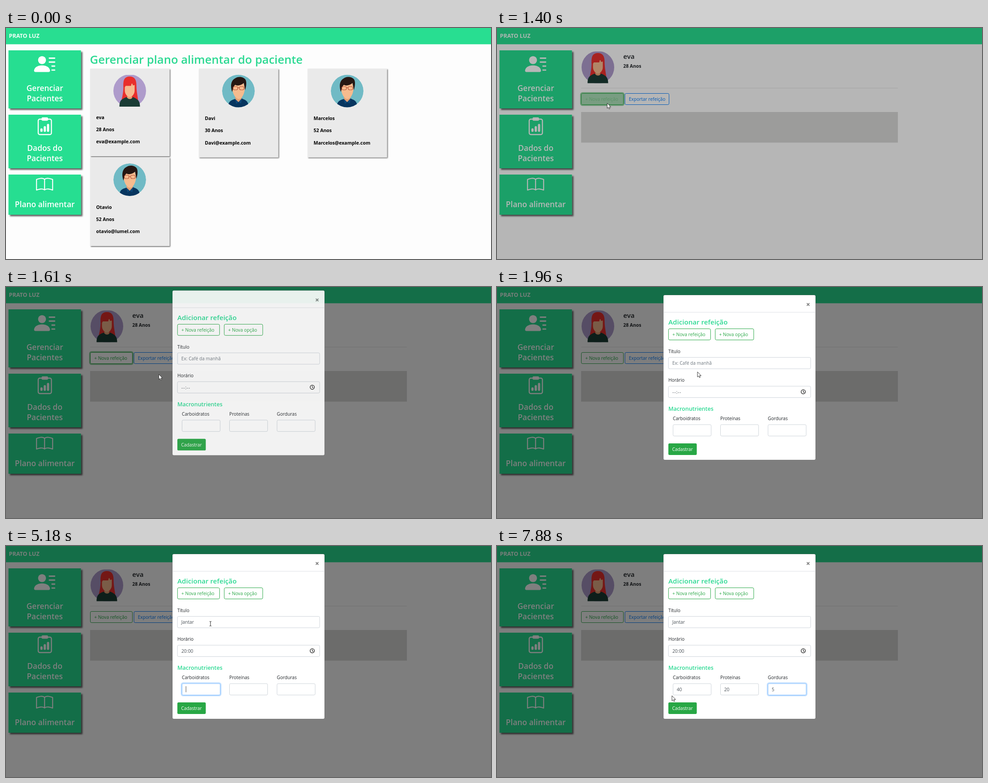
Animation, 1084 px wide and 517 px high, one loop 8000 ms. Source, as an HTML page:

```html
<!DOCTYPE html>
<html lang="pt">
<head>
<meta charset="utf-8">
<title>Plano alimentar</title>
<style>
html, body { margin: 0; width: 100%; height: 100%; overflow: hidden; background: #fdfdfd; }
svg { display: block; width: 1084px; height: 517px; font-family: "Open Sans", "Noto Sans", sans-serif; }
text { white-space: pre; }
</style>
</head>
<body>
<svg id="stage" viewBox="0 0 1084 517" xmlns="http://www.w3.org/2000/svg"></svg>
<script>
const GREEN = '#28de91', BTN = '#28a745', BLUE = '#007bff', INK = '#212529', VALUE = '#495057';
const LOOP = 8000;

// ---- markup helpers ----
const text = (x, y, s, size = 10.2, fill = INK, weight = 400, extra = '') =>
  `<text x="${x}" y="${y}" font-size="${size}" fill="${fill}" font-weight="${weight}" ${extra}>${s}</text>`;
const rect = (x, y, w, h, fill, extra = '') =>
  `<rect x="${x}" y="${y}" width="${w}" height="${h}" fill="${fill}" ${extra}/>`;
const path = (d, fill, extra = '') => `<path d="${d}" fill="${fill}" ${extra}/>`;
const group = (id, body, extra = '') => `<g id="${id}" ${extra}>${body}</g>`;
const outline = (x, y, w, label, color, id = '') =>
  rect(x, y, w, 25, 'none', `rx="2.7" stroke="${color}"`) +
  text(x + 8.7, y + 16.5, label, 10.2, color, 400, id && `id="${id}Text"`);
const input = (id, x, y, w) =>
  rect(x - 1.6, y - 1.6, w + 3.2, 28.7, 'none', `id="${id}Ring" rx="4" stroke="${BLUE}" stroke-opacity=".25" stroke-width="2.4" opacity="0"`) +
  rect(x, y, w, 25.5, '#fff', `id="${id}Box" rx="2.7" stroke="#ced4da"`);

const woman = (x, y) => `<g transform="translate(${x} ${y})" clip-path="url(#flat)">
  <circle r="36.5" fill="#ae9bcb"/>
  ${path('M-14-12C-15-26-10-32 0-32C10-32 15-26 15-12C15 2 18 12 19 24H-19C-16 12-14 2-14-12Z', '#e92f2c')}
  ${path('M-5 6H5V17L0 23L-6 17Z', '#e5a173')}
  ${path('M-11-16H11V0C11 7 5 14 0 14C-5 14-11 7-11 0Z', '#f6ba8f')}
  ${path('M-14-8C-15-24-8-30 0-30C9-30 15-22 14-8L11-13L7-12L5-19L3-11L-9-11L-11-8Z', '#e92f2c')}
  ${path('M-23 36C-23 23-20 19-7 14C-3 20 4 20 7 14C19 19 23 23 23 36Z', '#1a3c35')}</g>`;
const man = (x, y) => `<g transform="translate(${x} ${y})" clip-path="url(#disc)">
  <circle r="36.5" fill="#70bac5"/>
  ${path('M-7 6H7V22L0 26L-7 20Z', '#e5a173')}
  ${path('M-14-10L-5-17C2-13 9-18 11-20L14-8C15 4 8 18 1 18C-7 18-14 5-14-10Z', '#f6bb8e')}
  ${path('M-14 2C-19-12-16-24-8-28C0-34 12-32 16-25C19-19 17-9 15-2L12-18C6-12-4-11-7-14C-12-10-12-4-14 2Z', '#261713')}
  <g fill="none" stroke="#b5533a" stroke-width="1.2"><rect x="-12" y="-10" width="10.500" height="7.500" rx="3.400"/>
  <rect x="2" y="-10" width="10.500" height="7.500" rx="3.400"/><path d="M-1.500-7Q.2-8.500 2-7"/></g>
  ${path('M-24 37C-22 23-18 21-8 18L0 25L8 17C18 21 22 23 23 37Z', '#07355f')}
  ${path('M-8 17L0 25L-5 29ZM8 16L0 25L6 28Z', '#0d4677')}</g>`;

const card = (x, y, h, face, lines) =>
  rect(x, y, 177.5, h, '#eaeaea', 'filter="url(#soft)"') + face(x + 88.5, y + (face === woman ? 49.5 : 50)) +
  lines.map((s, i) => text(x + 13.5, y + h - 83.5 + i * 27.3, s, 10.5, '#000', 700)).join('');

const tile = (y, h, lines, base) =>
  rect(5.5, y, 162, h, GREEN, 'filter="url(#drop)"') +
  lines.map((s, i) => text(86.7, base + i * 23.4, s, 17.4, '#fff', 600, 'text-anchor="middle"')).join('');

// ---- scene pieces ----
const defs = `<defs>
  <clipPath id="disc"><circle r="36.5"/></clipPath>
  <clipPath id="flat"><rect x="-37" y="-35.5" width="74" height="71"/></clipPath>
  <filter id="drop" x="-10%" y="-10%" width="120%" height="120%"><feDropShadow dx="3.4" dy="3.4" stdDeviation="1.5" flood-color="#000" flood-opacity=".6"/></filter>
  <filter id="soft" x="-10%" y="-10%" width="120%" height="120%"><feDropShadow dx="1.6" dy="1.6" stdDeviation=".9" flood-color="#000" flood-opacity=".6"/></filter>
</defs>`;

const icons = `<g transform="translate(62.700 57) scale(2.97)" fill="#fff"><circle cx="6" cy="5" r="3"/>
  <path d="M1 14s-1 0-1-1 1-4 6-4 6 3 6 4-1 1-1 1z"/>
  <path d="M11.500 3.500h4M11.500 6.500h4M13.500 9.500h2M13.500 12.500h2" stroke="#fff" stroke-linecap="round"/></g>
  <rect x="72" y="204" width="29.500" height="34.500" rx="3.500" fill="none" stroke="#fff" stroke-width="2.400"/>
  <rect x="79.500" y="200" width="14.500" height="7.500" rx="2.500" fill="#fff"/>
  <path d="M79.300 227V230M86.700 222V230M94 217V230" stroke="#fff" stroke-width="5" stroke-linecap="round"/>
  <g transform="translate(67 333) scale(2.4)" fill="none" stroke="#fff" stroke-width=".9" stroke-linejoin="round">
  <path d="M8 2.400C7 1.400 5.600 1.300 4.400 1.440 3 1.600 1.600 2 .5 2.500V12.400c1.200-.5 2.500-.85 3.800-1 1.400-.1 2.800 0 3.700.9V2.400c1-1 2.400-1.100 3.600-.96 1.400.16 2.800.56 3.900 1.060V12.400c-1.200-.5-2.500-.85-3.800-1-1.400-.1-2.800 0-3.700.9"/></g>`;

const shell = rect(0, 0, 1084, 517, '#fdfdfd') + rect(0, 0, 1084, 36.4, GREEN) +
  text(6.5, 22.3, 'PRATO LUZ', 12.6, '#f4fff9', 700) +
  tile(50, 130, ['Gerenciar', 'Pacientes'], 140.7) +
  tile(194, 120, ['Dados do', 'Pacientes'], 274.8) +
  tile(328, 90, ['Plano alimentar'], 401.4) + icons;

const list = text(187.6, 79.5, 'Gerenciar plano alimentar do paciente', 25.6, '#2bd992', 600) +
  card(188, 91, 196, woman, ['eva', '28 Anos', 'eva@example.com']) +
  card(431, 91, 198.5, man, ['Davi', '30 Anos', 'Davi@example.com']) +
  card(674, 91, 198.5, man, ['Marcelos', '52 Anos', 'Marcelos@example.com']) +
  card(188, 289.5, 198.5, man, ['Otavio', '52 Anos', 'otavio@lumel.com']);

const patient = woman(225.5, 88) + text(282.3, 69, 'eva', 15, INK, 600) +
  text(282.3, 89, '28 Anos', 10.4, INK, 700) +
  rect(188, 134, 708, 1, '#e6e6e6') +
  rect(187, 145, 97, 28, 'none', `id="newRing" rx="4" stroke="${BTN}" stroke-opacity=".5" stroke-width="2.4"`) +
  rect(188.5, 146.5, 94, 25, BTN, 'id="newFill" rx="2.7"') +
  outline(188.5, 146.5, 94, '+ Nova refeição', BTN, 'new') +
  outline(286, 146.5, 98.5, 'Exportar refeição', BLUE) +
  rect(188, 188, 708, 68.5, '#d9d9d8');

const macros = [['carb', 393.5, 'Carboidratos'], ['prot', 499.5, 'Proteínas'], ['fat', 605.8, 'Gorduras']];
const dialog = rect(372, 18, 340, 369, '#fff', 'rx="3" stroke="#000" stroke-opacity=".2"') +
  rect(372, 56, 340, 1, '#dee2e6') +
  path('M692.500 36.200L698.300 42M698.300 36.200L692.500 42', 'none', 'stroke="#7f7f7f" stroke-width="1.8"') +
  text(383, 84, 'Adicionar refeição', 15.15, '#2bd992', 600) +
  outline(383.3, 93.5, 94, '+ Nova refeição', BTN) + outline(487.8, 93.5, 86, '+ Nova opção', BTN) +
  text(383, 147.7, 'Título') + input('title', 383.2, 157.5, 317.8) +
  text(391.8, 174.3, '', 10.2, VALUE, 400, 'id="titleText"') +
  text(383, 212, 'Horário') + input('time', 383.2, 222, 317.8) +
  rect(392, 227, 12, 14, '#0078d7', 'id="mark"') +
  text(392, 238.7, '', 10.2, VALUE, 400, 'id="hour"') + text(400, 238.7, ':', 10.2, VALUE, 400, 'id="colon"') +
  text(403, 238.7, '', 10.2, VALUE, 400, 'id="minute"') +
  '<circle cx="684.500" cy="234.500" r="4.700" fill="none" stroke="#111" stroke-width="1.300"/>' +
  path('M684.500 231.500V234.800L687 236', 'none', 'stroke="#111" stroke-width="1.1"') +
  text(383, 277.2, 'Macronutrientes', 12.5, '#2bd992', 600) +
  macros.map(([id, x, name]) => text(x - .5, 298, name) + input(id, x, 308, 85.2) +
    text(x + 8.2, 324.7, '', 10.2, VALUE, 400, `id="${id}Text"`)).join('') +
  rect(383, 350, 63.5, 26, BTN, 'rx="2.7"') + text(391.4, 367, 'Cadastrar', 10.2, '#fff') +
  rect(0, 0, .8, 13.5, '#222', 'id="caret"');

const cursors =
  group('arrow', path('M0 0V11.500L2.600 9.200L4.400 13L6.300 12.100L4.600 8.500H8.200Z', '#fff', 'stroke="#222" stroke-width=".9" stroke-linejoin="round"')) +
  group('hand', path('M-1.300 1C-1.300-.4 1-.4 1 1V5.500C1.400 4.600 3 4.800 3.100 6C3.600 5.200 5 5.400 5.200 6.600C5.800 5.900 7.200 6.300 7.200 7.600V11C7.200 13 6 14 6 15.800H-.6C-.8 13.700-3.600 11-4 9.400C-4.100 8-2.600 7.700-1.300 9.600Z', '#fff', 'stroke="#222" stroke-width=".9" stroke-linejoin="round"')) +
  group('beam', path('M-2.200-5.200Q0-5.200 0-4Q0-5.200 2.200-5.200M0-4V4M-2.200 5.200Q0 5.200 0 4Q0 5.200 2.200 5.200', 'none', 'stroke="#222" stroke-width="1"'));

document.getElementById('stage').innerHTML = defs + shell + group('list', list) + group('patient', patient) +
  rect(0, 0, 1084, 517, '#000', 'id="shade"') + group('dialog', dialog) + group('cursor', cursors);

// ---- timing ----
const el = id => document.getElementById(id);
const set = (id, name, value) => el(id).setAttribute(name, value);
const show = (id, on) => set(id, 'visibility', on ? 'inherit' : 'hidden');
const ramp = (t, start, span) => Math.min(1, Math.max(0, (t - start) / span));
const latest = (steps, t) => steps.reduce((found, s) => s[0] <= t ? s : found, steps[0]);
const toWhite = (rgb, k) => `rgb(${rgb.map(c => Math.round(c + (255 - c) * k))})`;

const trail = [
  [170, 912, 482], [510, 261, 219], [980, 261, 219], [1190, 240, 163], [1320, 246, 168], [1400, 246, 168],
  [1470, 263, 186], [1680, 380, 200], [1960, 448, 190], [2170, 457, 174], [7480, 457, 174],
  [7670, 408, 262], [7800, 379, 328], [7880, 391, 335]
];
const shapes = [[0, 'arrow'], [330, 'hand'], [1000, 'arrow'], [1130, 'hand'], [1370, 'arrow'], [2080, 'beam'], [7550, 'arrow']];

// each field: focus start, focus end, typed states
const fields = {
  title: { on: 2240, off: 3840, x: 391.8, y: 163.5, keys: [[2240, ''], [2780, 'J'], [3110, 'Ja'], [3240, 'Jan'], [3440, 'Jant'], [3540, 'Janta'], [3640, 'Jantar']] },
  time: { on: 3840, off: 5040 },
  carb: { on: 5040, off: 5990, x: 401.8, y: 313.8, keys: [[5010, ''], [5710, '4'], [5860, '40']] },
  prot: { on: 5990, off: 6730, x: 507.8, y: 313.8, keys: [[5990, ''], [6200, '2'], [6400, '20']] },
  fat: { on: 6730, off: LOOP, x: 614, y: 313.8, keys: [[6730, ''], [7270, '5']] }
};
const clock = [[0, '--', '--'], [4380, '02', '--'], [4510, '20', '--'], [4710, '20', '00']];

function cursorAt(t) {
  const i = trail.findIndex(p => p[0] > t);
  if (i < 0) return trail[trail.length - 1].slice(1);
  if (i === 0) return trail[0].slice(1);
  const [a, b] = [trail[i - 1], trail[i]], k = (t - a[0]) / (b[0] - a[0]);
  return [a[1] + (b[1] - a[1]) * k, a[2] + (b[2] - a[2]) * k];
}

function drawFields(t) {
  show('caret', false);
  for (const [id, f] of Object.entries(fields)) {
    const glow = ramp(t, f.on, 140) - ramp(t, f.off, 140);
    set(id + 'Ring', 'opacity', glow);
    set(id + 'Box', 'stroke', glow > .5 ? '#80bdff' : '#ced4da');
    if (!f.keys) continue;
    const [since, value] = latest(f.keys, t), node = el(id + 'Text');
    const hint = id === 'title' && !value;
    node.textContent = hint ? 'Ex: Café da manhã' : value;
    node.setAttribute('fill', hint ? '#6c757d' : VALUE);
    if (t >= f.on && t < f.off && (t - since) % 1000 < 500) {
      show('caret', true);
      set('caret', 'x', f.x + (value ? node.getComputedTextLength() : 0));
      set('caret', 'y', f.y);
    }
  }
}

function drawClock(t) {
  const [, hour, minute] = latest(clock, t);
  const colonX = hour === '--' ? 400.5 : 403.7, minX = colonX + 3;
  const active = t < 3840 || t >= 5040 ? '' : t < 4510 ? 'hour' : 'minute';
  for (const [id, value, x] of [['hour', hour, 392], ['minute', minute, minX]]) {
    el(id).textContent = value;
    set(id, 'x', x);
    set(id, 'letter-spacing', value === '--' ? 1 : 0);
    set(id, 'fill', active === id ? '#fff' : VALUE);
  }
  set('colon', 'x', colonX);
  show('mark', active);
  set('mark', 'x', active === 'minute' ? minX : 391.7);
  set('mark', 'width', (active === 'minute' ? minute : hour) === '--' ? 9 : 12);
}

function draw(t) {
  show('list', t < 650);
  show('patient', t >= 650);
  const hover = ramp(t, 1120, 140) - ramp(t, 1316, 140);
  set('newFill', 'opacity', hover);
  set('newText', 'fill', toWhite([40, 167, 69], hover));
  set('newRing', 'opacity', ramp(t, 1250, 140) - ramp(t, 1790, 150));
  set('shade', 'opacity', .5 * ramp(t, 1316, 150));

  const slide = 1 - (1 - ramp(t, 1475, 300)) ** 2;
  set('dialog', 'opacity', ramp(t, 1475, 150));
  set('dialog', 'transform', `translate(0 ${-34 * (1 - slide)})`);
  drawFields(t);
  drawClock(t);

  const kind = latest(shapes, t)[1];
  for (const id of ['arrow', 'hand', 'beam']) show(id, id === kind);
  show('cursor', t >= 170);
  set('cursor', 'transform', `translate(${cursorAt(t).join(' ')})`);
}

function tick() {
  draw(performance.now() % LOOP);
  requestAnimationFrame(tick);
}
tick();
</script>
</body>
</html>
```
